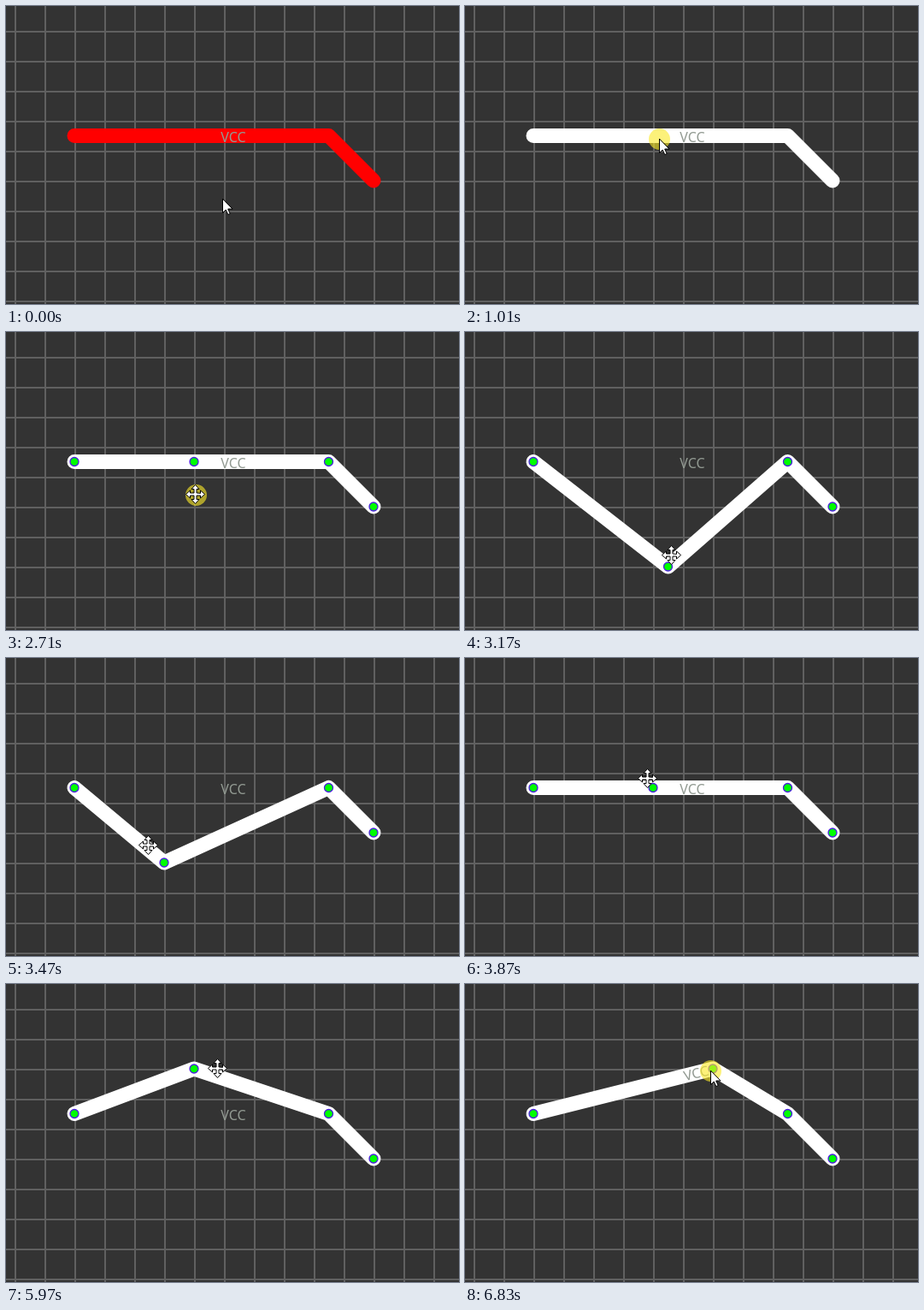
These frames come from a looping animation (530 by 348 pixels, 7.69 s). An HTML page with a canvas:

```html
<!DOCTYPE html>
<html>
<head>
<meta charset="utf-8">
<style>
html, body { margin: 0; overflow: hidden; background: #333; }
canvas { display: block; }
</style>
</head>
<body>
<canvas width="530" height="348"></canvas>
<script>
const ctx = document.querySelector('canvas').getContext('2d');
const LOOP = 7690, TICK = 77, GRID = 35, SNAP = GRID / 2;
const HOVER = 620, SELECT = 1080, INSERT = 2170, DRAG = 2710, DROP = 6830;
const START = [80, 151.5], BEND = [377.5, 151.5], END = [430, 204];
const CLICKS = [1010, 1780, 2550], CLICK_TIME = 310;

// Pointer moves: first tick, last tick, evenly timed waypoints
const moves = [
  [0, 0, [253, 225]],
  [300, 620, [251, 212], [227, 155]],
  [1400, 1400, [215, 152]],
  [2170, 2170, [214, 152]],
  [2710, 2860, [222, 190], [241, 271]],
  [3170, 4020, [242, 261], [165, 222], [188, 185], [214, 154], [214, 105]],
  [5030, 5200, [210, 105], [165, 96]],
  [5350, 5500, [140, 93], [222, 97]],
  [5970, 6210, [248, 99], [287, 101]]
];

function along(points, f) {
  const at = f * (points.length - 1), i = Math.floor(at);
  const a = points[i], b = points[i + 1] || a;
  return a.map((v, axis) => v + (b[axis] - v) * (at - i));
}

const snap = p => p.map((v, axis) => START[axis] + SNAP * Math.round((v - START[axis]) / SNAP));

// Pointer position, and the corner that trails it by one tick until it rests
function pose(t) {
  const m = moves.findLastIndex(move => move[0] <= t);
  const [from, to, ...points] = moves[m];
  const ticks = Math.round((to - from) / TICK) || 1;
  const tick = from === to ? ticks : Math.min(ticks, Math.floor((t - from) / (to - from) * ticks + 0.1));
  const pointer = along(points, tick / ticks);
  const trail = tick === ticks ? pointer
    : tick > 0 ? along(points, (tick - 1) / ticks)
    : m > 0 ? moves[m - 1].at(-1) : pointer;
  return { pointer, corner: t < DRAG ? [214, START[1]] : snap(trail) };
}

const arrow = new Path2D('M.5.5V16.5L4.2 13 6.8 18.6 9.2 17.5 6.7 12H11.7Z');
const arm = [[1.5, -1.5], [1.5, -6], [4.5, -6], [0, -11], [-4.5, -6], [-1.5, -6]];
const cross = new Path2D();
for (let i = 0; i < 4; i++) {
  const c = [1, 0, -1, 0][i], s = [0, -1, 0, 1][i];
  for (const [x, y] of arm) cross.lineTo(x * c - y * s - 0.5, x * s + y * c - 0.5);
}
cross.closePath();

function disc([x, y], r, fill) {
  ctx.beginPath();
  ctx.arc(x, y, r, 0, 2 * Math.PI);
  ctx.fillStyle = fill;
  ctx.fill();
}

function drawGrid() {
  ctx.fillStyle = '#333';
  ctx.fillRect(0, 0, 530, 348);
  ctx.fillStyle = '#606060';
  for (let x = 10; x < 530; x += GRID) ctx.fillRect(x, 0, 2, 348);
  for (let y = 29; y < 348; y += GRID) ctx.fillRect(0, y, 530, 2);
}

function drawTrack(points, color) {
  ctx.beginPath();
  for (const p of points) ctx.lineTo(...p);
  ctx.lineWidth = 17;
  ctx.lineCap = ctx.lineJoin = 'round';
  ctx.strokeStyle = color;
  ctx.stroke();
}

function drawLabel(x, y, angle) {
  ctx.save();
  ctx.translate(x, y);
  ctx.rotate(angle);
  ctx.font = '16px "Noto Sans", "Open Sans", sans-serif';
  ctx.textAlign = 'center';
  ctx.fillStyle = '#929a92';
  ctx.fillText('VCC', 0, 5.5);
  ctx.restore();
}

function drawHandle(p) {
  disc(p, 5, '#0f0');
  ctx.lineWidth = 1.3;
  ctx.strokeStyle = '#4a1ce0';
  ctx.stroke();
}

function drawPointer([x, y], shape) {
  ctx.save();
  ctx.translate(Math.round(x), Math.round(y));
  ctx.lineJoin = 'miter';
  ctx.lineWidth = 1;
  ctx.strokeStyle = '#000';
  ctx.fillStyle = '#fff';
  ctx.fill(shape);
  ctx.stroke(shape);
  ctx.restore();
}

function draw(t) {
  const { pointer, corner } = pose(t);
  const points = t < INSERT ? [START, BEND, END] : [START, corner, BEND, END];
  const clicked = t >= DROP || CLICKS.some(c => t >= c && t < c + CLICK_TIME);

  drawGrid();
  drawTrack(points, t < HOVER ? '#f00' : '#fff');
  if (t < DROP) drawLabel(266, 153, 0);
  else drawLabel(270.5, 104.4, Math.atan2(corner[1] - START[1], corner[0] - START[0]));
  if (t >= SELECT) points.forEach(drawHandle);
  if (clicked) disc(pointer.map(v => v + 0.5), 12.5, 'rgba(250, 232, 40, .62)');
  drawPointer(pointer, t >= DRAG && t < DROP ? cross : arrow);
}

const begin = performance.now();
function tick() {
  draw((performance.now() - begin) % LOOP);
  requestAnimationFrame(tick);
}
tick();
</script>
</body>
</html>
```
